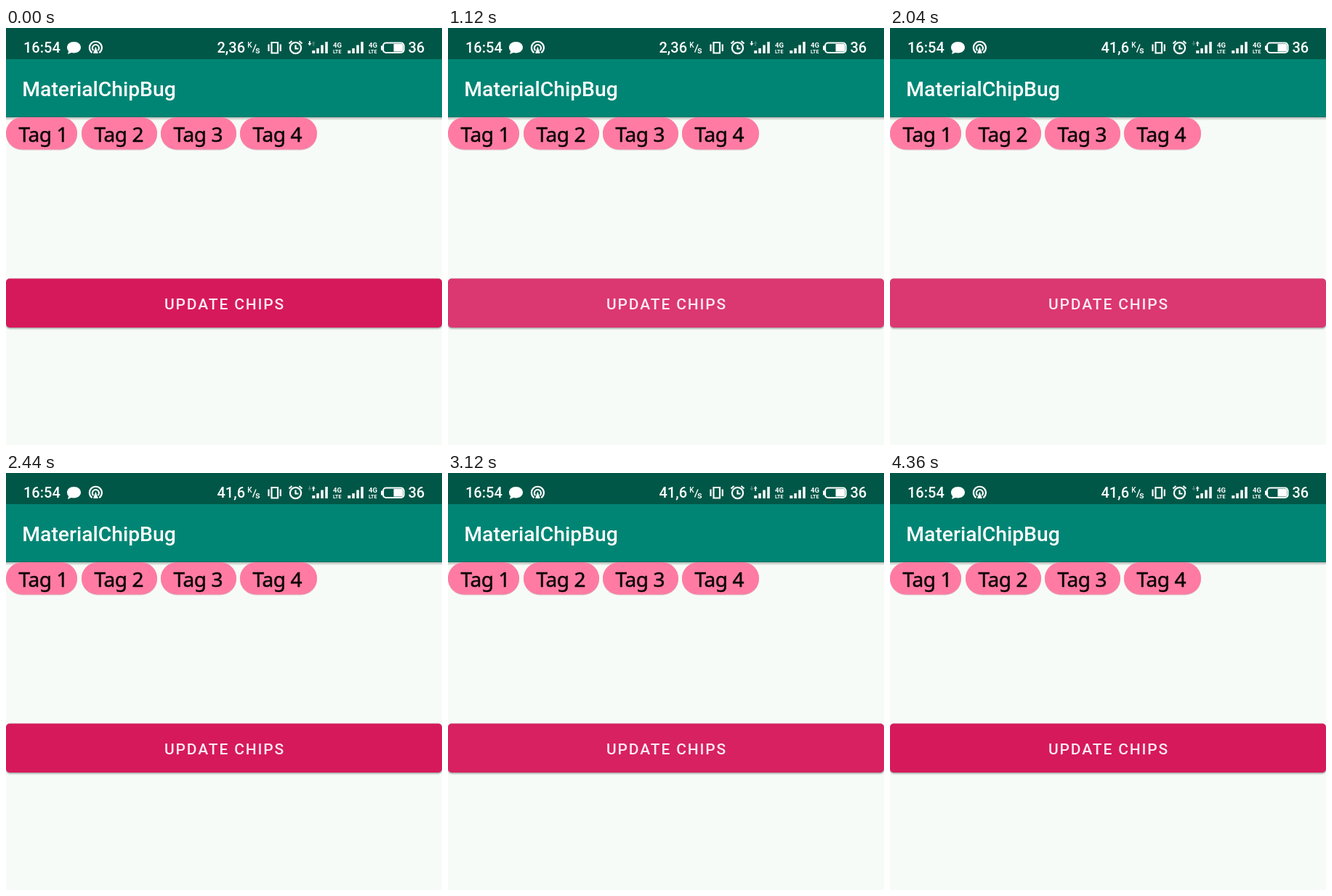
Recreate the animation shown at these times as an HTML page. Size 600 by 575 pixels, loop 4400 ms.

```html
<!DOCTYPE html>
<html lang="en">
<head>
<meta charset="utf-8">
<title>MaterialChipBug</title>
<style>
html, body { margin: 0; width: 100%; height: 100%; overflow: hidden; background: #f7fbf7; }
svg { display: block; width: 600px; height: 575px; }
text { font-family: Roboto, sans-serif; fill: #fff; }
.status { font-size: 20px; font-weight: 500; }
.status .line { fill: none; stroke: #fff; stroke-width: 2.2; }
.title { font-size: 28.3px; font-weight: 500; }
.chip text {
  font: 28px "Noto Sans", "Open Sans", sans-serif; letter-spacing: -.4px;
  fill: #0c0608; stroke: #0c0608; stroke-width: .5px;
}
.label { font-size: 21px; font-weight: 500; letter-spacing: 1.85px; fill: #fbe9f0; }
</style>
</head>
<body>
<svg viewBox="0 0 600 575">
  <defs>
    <linearGradient id="barShade" x2="0" y2="1">
      <stop offset="0" stop-color="#000" stop-opacity=".3"/>
      <stop offset="1" stop-color="#000" stop-opacity="0"/>
    </linearGradient>
    <radialGradient id="touch">
      <stop offset="0" stop-color="#f4a9c6"/>
      <stop offset=".5" stop-color="#f0b0c9"/>
      <stop offset=".78" stop-color="#f2c6d6"/>
      <stop offset=".82" stop-color="#f2c6d6" stop-opacity=".45"/>
      <stop offset="1" stop-color="#f2c6d6" stop-opacity="0"/>
    </radialGradient>
    <filter id="soft" x="-5%" y="-20%" width="110%" height="150%"><feGaussianBlur stdDeviation="1.2"/></filter>
    <clipPath id="buttonClip"><rect y="345.500" width="600" height="67.500" rx="5"/></clipPath>
    <path id="bars" fill="#fff" d="M0 31h4v4h-4zM6 28h3.500v7h-3.500zM12 23.500h3.500v11.500h-3.500zM18 19h3.500v16h-3.500z"/>
    <g id="net" font-weight="700">
      <text y="26.500" font-size="9.500">4G</text>
      <text y="35.300" font-size="7">LTE</text>
    </g>
  </defs>

  <rect width="600" height="575" fill="#f7fbf7"/>
  <rect y="43" width="600" height="80" fill="#008574"/>
  <rect width="600" height="43" fill="#005747"/>
  <rect y="122.500" width="600" height="5" fill="url(#barShade)"/>
  <text class="title" x="22.300" y="93.500">MaterialChipBug</text>

  <g class="status">
    <text x="24" y="34">16:54</text>
    <path fill="#fff" d="M93.500 19c5.500 0 9.500 3.400 9.500 7.700s-4 7.700-9.500 7.700c-1.300 0-2.400-.2-3.500-.5l-5 2.100 1.200-3.900c-1.400-1.400-2.200-3.300-2.200-5.400 0-4.300 4-7.700 9.500-7.700z"/>
    <path class="line" d="M118.500 34.200a8.500 8.500 0 1 1 9.800 0M120.300 31a4.600 4.600 0 1 1 6.200 0"/>
    <path fill="#fff" d="M123.400 25.500l3.400 9.500h-6.800z"/>
    <text id="speed" x="290.500" y="34"></text>
    <text font-size="10" x="332.300" y="27.300">K</text>
    <path d="M339.500 33.500l4.500-11" stroke="#fff" stroke-width="1.400"/>
    <text font-size="13" x="343" y="34.500">s</text>
    <path class="line" d="M365.500 20h8.500v14.500h-8.500zM361.500 22.500v9.500M377.800 22.500v9.500"/>
    <circle class="line" cx="398.500" cy="27.500" r="7.600"/>
    <path class="line" d="M398.500 23.500v5h4M389.500 21.500l4-3.500M407.500 21.500l-4-3.500"/>
    <path id="down" fill="#fff" d="M417 18h1.800v3h1.700l-2.600 3.500-2.600-3.500h1.700z"/>
    <path id="up" fill="#fff" d="M422.300 25h1.800v-3.500h1.600l-2.500-3.500-2.500 3.500h1.600z"/>
    <use href="#bars" x="421.300"/>
    <use href="#net" x="450"/>
    <use href="#bars" x="470.300"/>
    <use href="#net" x="499"/>
    <rect class="line" x="519" y="20.500" width="28.500" height="13.500" rx="4"/>
    <path fill="#fff" d="M516 24.500h3v6h-3zM533.500 22h11q1.500 0 1.500 1.500v7.500q0 1.500-1.500 1.500h-11z"/>
    <text x="553.500" y="34">36</text>
  </g>

  <g id="chips"></g>

  <rect y="346.500" width="600" height="68" rx="5" fill="#000" opacity=".38" filter="url(#soft)"/>
  <g clip-path="url(#buttonClip)">
    <rect y="345" width="600" height="69" fill="#d6195b"/>
    <circle id="ripple" fill="#fff"/>
  </g>
  <text class="label" x="218" y="387.500">UPDATE CHIPS</text>
  <circle id="dot" r="19" fill="url(#touch)"/>
</svg>
<script>
const LOOP = 4400, STEP = 40;
const el = id => document.getElementById(id);
const set = (node, attrs) => {
  for (const key in attrs) node.setAttribute(key, attrs[key]);
};

// left edge, width
const chips = [[0, 98], [104, 104], [213, 104], [322, 106]];
el('chips').innerHTML = chips.map(([x, w], i) => `
  <g class="chip">
    <rect x="${x}" y="124" width="${w}" height="44.500" rx="22" fill="#d9c3ca"/>
    <rect x="${x}" y="123" width="${w}" height="44.500" rx="22" fill="#ff7ba3"/>
    <text x="${x + 17.500}" y="157">Tag ${i + 1}</text>
  </g>`).join('');

// press time, x, y
const taps = [[720, 496, 382], [1640, 492, 384], [2600, 490, 378], [3480, 488, 364]];

// [age, value] keys with linear steps between them
const dotFade = [[0, .6], [40, 1], [100, 1], [160, .16], [200, 0]];
const rippleFade = [[80, 0], [120, .18], [160, .24], [260, .24], [520, .035], [560, 0]];
const rippleSize = [[80, 0], [120, 240], [160, 510]];

function track(keys, t) {
  if (t <= keys[0][0]) return keys[0][1];
  for (let i = 1; i < keys.length; i++) {
    const [a, from] = keys[i - 1], [b, to] = keys[i];
    if (t <= b) return from + (to - from) * (t - a) / (b - a);
  }
  return keys[keys.length - 1][1];
}

function draw(t) {
  const tap = taps.filter(([start]) => start <= t).pop();
  const [start, x, y] = tap || [0, 0, 0];
  const age = t - start;
  set(el('dot'), { cx: x, cy: y, opacity: tap ? track(dotFade, age) : 0 });
  set(el('ripple'), {
    cx: x, cy: y, r: tap ? track(rippleSize, age) : 0,
    opacity: tap ? track(rippleFade, age) : 0
  });

  el('speed').textContent = t < 1200 ? '2,36' : '41,6';
  const sending = t >= 2000 && t < 3320 || t >= 4000;
  set(el('down'), { opacity: sending ? .25 : .95 });
  set(el('up'), { opacity: sending ? .95 : .25 });
}

const origin = performance.now();
function tick() {
  const t = (performance.now() - origin) % LOOP;
  draw(Math.floor(t / STEP) * STEP);
  requestAnimationFrame(tick);
}
draw(0);
requestAnimationFrame(tick);
</script>
</body>
</html>
```
